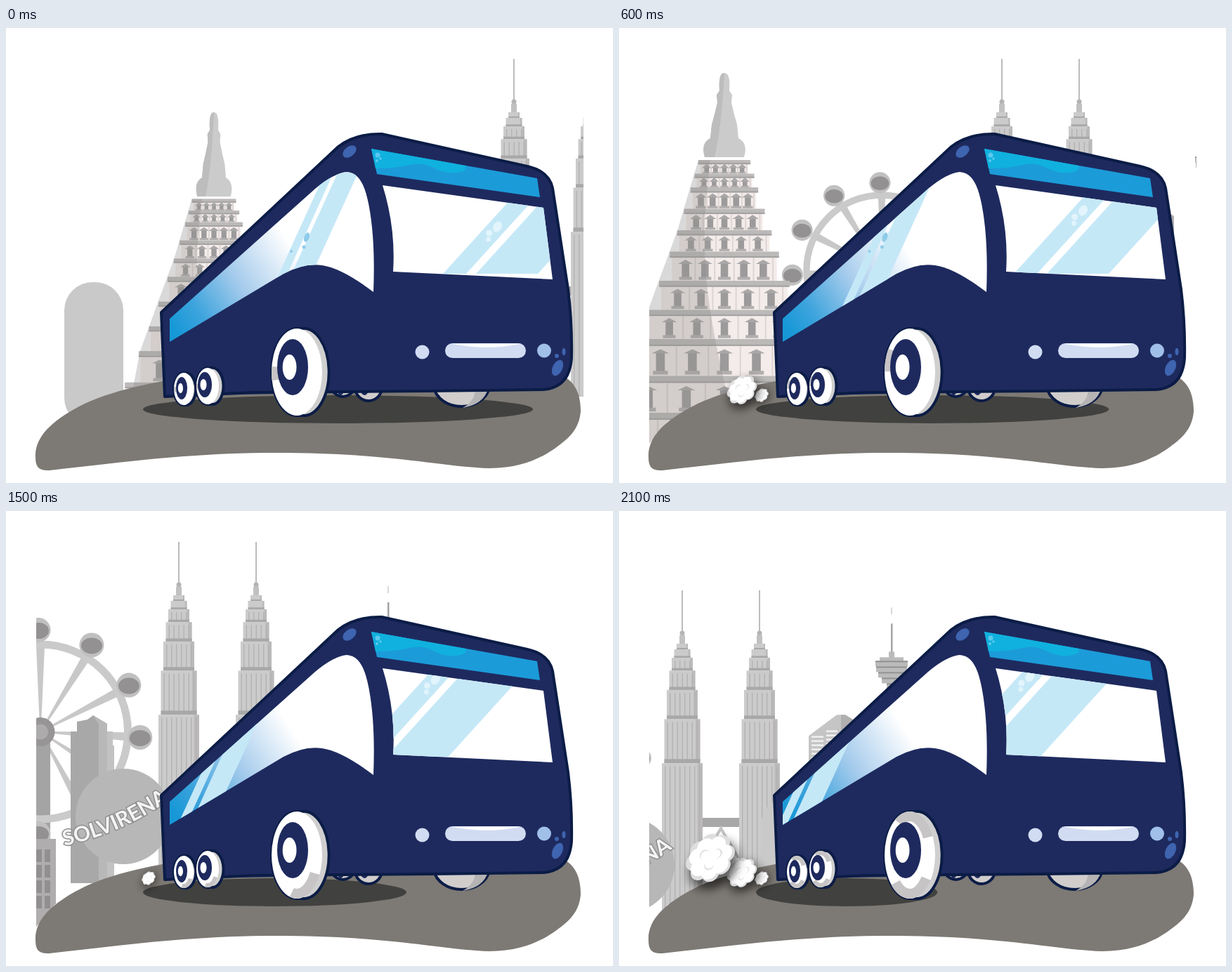
These frames come from a looping animation (864 by 648 pixels, 2400 ms). An HTML page:

```html
<!DOCTYPE html>
<html lang="en">
<head>
<meta charset="utf-8">
<title>Coach tour</title>
<style>
  html, body { margin: 0; width: 100%; height: 100%; overflow: hidden; background: #fff; }
  svg { display: block; width: 100vw; height: 100vh; }
  .sign { font: 700 30px Lato, "Open Sans", sans-serif; fill: #f4f4f4; stroke: #8f8f8f; stroke-width: 3px; paint-order: stroke; }
</style>
</head>
<body>
<svg viewBox="0 0 864 648">
  <defs>
    <clipPath id="stage"><path d="M43 40H822V525H790V560H70L43 592Z"/></clipPath>
    <clipPath id="frontGlass"><path d="M536 224L765 256L778 358L551 347Q555 285 536 224Z"/></clipPath>
    <clipPath id="sideGlass"><path d="M233 414L440 229Q466 207 485 205C503 206 511 225 516 250Q526 300 523 376Q478 342 450 338Q425 334 395 350L233 447Z"/></clipPath>
    <linearGradient id="sideFill" gradientUnits="userSpaceOnUse" x1="240" y1="430" x2="412" y2="318">
      <stop offset="0" stop-color="#1798d7"/><stop offset=".2" stop-color="#3ba3dc"/>
      <stop offset=".55" stop-color="#a5cbec"/><stop offset="1" stop-color="#fff"/>
    </linearGradient>
    <filter id="soft" x="-60%" y="-60%" width="220%" height="220%"><feGaussianBlur stdDeviation="7"/></filter>
  </defs>

  <g clip-path="url(#stage)">
    <g id="wheel"></g>
    <g id="skyline">
      <g id="city" transform="translate(-122)">
        <path d="M-32 530V314H-23V300L-8 297L0 291L20 303V530Z" fill="#a9a8a8"/>
        <path d="M0 291L20 303V530H8V304Z" fill="#b9b8b8"/>
        <path d="M20 314H28V334H30V530H20Z" fill="#c3c2c2"/>
        <path d="M-147 441H-105V540H-147Z" fill="#959394"/>
        <path d="M-110 467H-53V600H-110Z" fill="#afadae"/>
      </g>
      <g id="mast"></g>
      <g id="towers"></g>
      <g transform="translate(-79 435)">
        <circle r="68" fill="#b7b7b7"/>
        <path id="arc" d="M-84 42Q-5 25 60 -20L110 -58" fill="none"/>
        <text class="sign"><textPath href="#arc">SOLVIRENA</textPath></text>
      </g>
    </g>
    <g id="temple"></g>
    <rect id="statue" x="-42" y="362" width="84" height="205" rx="40" fill="#c9c9c9"/>
  </g>

  <path fill="#7d7974" d="M42 612C40 580 70 556 112 535C190 499 330 484 480 482C640 480 750 484 795 497C812 506 818 525 818 546C816 570 803 583 785 596C765 611 735 627 688 627C620 625 550 606 400 605C270 604 180 617 62 630C48 631 42 626 42 612Z"/>
  <ellipse id="shade" cy="543" ry="20" fill="#41413f"/>
  <g id="smoke"></g>

  <g stroke="#0b1c46" stroke-width="4" fill="#d0cdcc">
    <path d="M609 512A40 32 0 0 0 688 512Z"/>
    <path d="M463 512A17 17 0 0 0 496 512ZM497 512A19 19 0 0 0 535 512Z"/>
    <path d="M668 514H686Q680 536 650 541Q668 531 668 514Z" fill="#b5b3b4" stroke="none"/>
    <path d="M470 514Q476 532 483 514ZM503 514Q510 532 518 514Z" fill="#1e2a5e" stroke="none"/>
  </g>

  <path id="body" fill="#1e2a5e" d="M221 405L473 169Q498 150 535 151L742 197Q773 204 778 228L800 372Q806 420 805 470Q802 512 765 515L600 517L350 519L226 525Z"/>
  <path fill="#22376f" d="M500 160L535 151L742 197Q768 203 774 222L756 214L520 172Z"/>
  <path fill="#26417f" d="M221 405L473 169Q498 150 535 151L577 161Q560 172 530 166Q522 190 497 194Q470 196 445 222L233 412L229 525H226Z"/>
  <path fill="#21366f" d="M224 479C300 458 380 430 470 428C560 426 620 452 680 445C740 432 755 392 802 384L805 470Q802 512 765 514L226 524Z"/>
  <path fill="#263f80" d="M420 516C520 515 560 488 630 485C720 483 760 470 805 430V470Q802 512 765 514Z"/>
  <use href="#body" style="fill:none" stroke="none"/>
  <path fill="none" stroke="#0b1c46" stroke-width="4" stroke-linejoin="round" d="M221 405L473 169Q498 150 535 151L742 197Q773 204 778 228L800 372Q806 420 805 470Q802 512 765 515L600 517L350 519L226 525Z"/>
  <g fill="#3f64b0">
    <ellipse cx="489" cy="176" rx="11" ry="7" transform="rotate(-38 489 176)"/>
    <ellipse cx="785" cy="484" rx="7" ry="12" transform="rotate(25 785 484)"/>
    <ellipse cx="794" cy="461" rx="2.5" ry="5"/><circle cx="784" cy="467" r="3"/>
  </g>

  <path fill="#1c9bd9" d="M520 172L756 214L760 241L528 208Z"/>
  <path fill="#10b1de" d="M520 172L654 196Q658 204 640 206C615 209 605 190 580 194Q555 200 526 200Z"/>
  <g fill="#5cc9ee"><circle cx="529" cy="181" r="3.5"/><circle cx="528" cy="189" r="2"/><circle cx="533" cy="186" r="1.8"/></g>

  <g clip-path="url(#frontGlass)">
    <path d="M530 215H785V365H530Z" fill="#fff"/>
    <path id="frontBands" fill="#c5e8f7" d="M-88 350H0L118 220H30ZM-135 350H-102L16 220H-17Z"/>
    <g id="frontDrops" fill="#e2f4fc"><ellipse cx="6" cy="-7" rx="6" ry="8" transform="rotate(30 6 -7)"/><circle cx="-6" cy="2" r="4.5"/><circle cx="-7" cy="11" r="3.5"/></g>
  </g>
  <g clip-path="url(#sideGlass)">
    <path d="M225 200H530V450H225Z" fill="url(#sideFill)"/>
    <g id="sideBands">
      <path fill="#c5e8f7" d="M-79 450H-50L64 200H35ZM-97 450H-85L29 200H17Z"/>
      <g fill="#8fcbea"><ellipse cx="-12" cy="298" rx="3.5" ry="7" transform="rotate(20 -12 298)"/><circle cx="-16" cy="312" r="2.5"/><circle cx="-34" cy="318" r="2"/></g>
    </g>
  </g>

  <g fill="#d1dcf2">
    <circle cx="592.500" cy="461.500" r="10"/><rect x="625" y="449" width="115" height="21" rx="10.500"/>
    <circle cx="766" cy="459.500" r="10" fill="#a1c0e9"/>
    <path fill="#fff" d="M634 449.500H733Q685 460 634 449.500Z"/>
  </g>
  <g id="tyres"></g>
</svg>

<script>
const $ = id => document.getElementById(id);
const STEP = 300, COUNT = 8;

const times = (n, make) => Array.from({ length: n }, (_, i) => make(i)).join("");
const rect = (x, y, w, h, fill) => `<rect x="${x}" y="${y}" width="${w}" height="${h}" fill="${fill}"/>`;
const oval = (x, y, rx, ry, attr) => `<ellipse cx="${x}" cy="${y}" rx="${rx}" ry="${ry}" ${attr}/>`;

function wheel() {
  const spin = i => { const a = i * Math.PI / 6; return a + .055 * Math.sin(a); };
  const spoke = i => `<path d="M-1.500 -18L-6 -122H6L1.500 -18Z" fill="#c9c8c8" transform="rotate(${spin(i) * 180 / Math.PI})"/>`;
  const cabin = i => {
    const x = 145 * Math.sin(spin(i)) - 3, y = -145 * Math.cos(spin(i));
    return oval(x, y, 17.5, 17.5, 'fill="#c1c0c0"') + oval(x, y + 1, 15, 11.5, 'fill="#939192"');
  };
  return times(12, spoke) + rect(-14, 0, 28, 290, "#a5a4a4") + rect(-14, 0, 8, 290, "#979596")
    + `<circle r="124.500" fill="none" stroke="#cbcaca" stroke-width="11"/>` + times(12, cabin)
    + `<circle r="20.500" fill="#979596"/><circle r="11" fill="#adabac"/>`;
}

// Tiers grow taller and wider towards the ground.
function tower() {
  let out = rect(-1, 44, 2, 64, "#bdbcbc") + `<circle cy="105" r="3.500" fill="#b5b4b4"/>` + rect(-4, 108, 8, 12, "#c2c1c1");
  for (let n = 0, y = 120; n < 7; n++) {
    const w = 8 + 3.5 * n, h = n < 6 ? 8 * 1.51 ** n : 310;
    out += rect(-w, y, 2 * w, h, "#cccbcb");
    if (n > 1) for (let x = 4 - w; x < w; x += 7) out += rect(x, y + 4, 1.4, h - 4, "#b3b2b2");
    out += rect(w * .75, y, w * .25, h, "#b3b2b2aa");
    if (n < 6) out += rect(-w, y + h - 2 - n * .8, 2 * w, 2 + n * .8, "#a9a8a8");
    y += h;
  }
  return out;
}

const towers = () => rect(28, 368, 56, 13, "#a9a8a8")
  + `<path d="M30 425L55 383L80 425" fill="none" stroke="#c4c3c3" stroke-width="4"/>`
  + tower() + `<g transform="translate(110)">${tower()}</g>`;

const mast = () => rect(-.5, 107, 1, 10, "#b5b4b4") + rect(-1, 130, 2.5, 50, "#a5a4a4")
  + rect(-4, 170, 8, 330, "#bcbbbb") + rect(-17, 178, 34, 6, "#bcbbbb")
  + times(5, n => {
    const w = 23 - n * n, y = 183 + n * 8;
    return rect(-w, y, 2 * w, 8, "#bcbbbb") + rect(-w, y, 2 * w, 2, "#929191");
  })
  + `<path d="M-118 290L-78 260H-66L-53 268V500H-118Z" fill="#c6c5c5"/><path d="M-72 260H-66L-53 268V500H-72Z" fill="#b0afaf"/>`
  + times(20, n => rect(-114, 290 + n * 6, 17, 2.5, "#f0f0f0") + rect(-93, 282 + n * 6, 16, 2.5, "#f0f0f0"));

function temple() {
  let out = "";
  for (let i = 0, y = 4; i < 11; i++) {
    const h = 19.5 + 11 * Math.floor((i + 1) / 3), w = 36 + .27 * y + .0003 * y * y;
    const inner = w - 3, bar = 4 + h / 9, gap = h - bar, step = inner * .37;
    const size = 4 + gap * .2, top = y + bar + gap * .18;
    out += rect(-inner, y, inner * 2, h, "#f4ecea") + times(5, k => {
      const x = (k - 2) * step;
      return rect(x - size / 2, top, size, gap * .75, "#9c9a9a")
        + `<path d="M${x - size} ${top + 3}L${x} ${top - 3}L${x + size} ${top + 3}Z" fill="#a9a7a7"/>`
        + rect(x - size * .85, top + gap * .65, size * 1.7, gap * .1 + 1, "#b1afaf")
        + rect(x + step / 2 - 1, y + bar, 2, gap, "#dcd5d4");
    }) + rect(-w, y, 2 * w, bar, "#bcb9b9") + rect(-w, y + bar - 2, 2 * w, 2, "#a3a1a1");
    y += h;
  }
  const half = "M0 -142Q-9 -142 -7 -112L-11 -105L-10 -92L-14 -72L-18 -55L-20 -32Q-34 -24 -28 0H";
  return out
    + `<path d="M-37 4L-20 4C-35 120 -30 190 0 320L25 450H-160L-124 260L-93 175L-67 105Z" fill="#8f8c8c" fill-opacity=".33"/>`
    + `<g id="spire"><path d="${half}0Z" transform="scale(-1 1)" fill="#cbcbcb"/><path d="${half}0Z" fill="#cbcbcb"/><path d="${half}-14Q-4 -50 0 -142Z" fill="#bdbdbd"/></g>`;
}

function puff(x, y, r) {
  const lobes = (n, d, size, fill) => times(n, i => {
    const a = i / n * 2 * Math.PI + d;
    return oval(Math.cos(a) * r * d, Math.sin(a) * r * d, r * size, r * size, `fill="${fill}"`);
  });
  return `<g transform="translate(${x} ${y}) rotate(-45) scale(1.08 .85)">`
    + oval(-r * .1, r * .35, r, r, 'fill="#000" fill-opacity=".6" filter="url(#soft)"')
    + lobes(8, .64, .36, "#dedede") + lobes(7, .54, .35, "#fff") + oval(0, 0, r * .6, r * .6, 'fill="#fff"')
    + lobes(3, .3, .2, "#dedede") + lobes(3, .25, .19, "#fff") + "</g>";
}

function tyre(x, y, rx, ry, depth, hubX, hubY, hubRx, hubRy) {
  const band = rx - hubRx;
  return `<path d="M${x} ${y - ry}H${x + depth * .6}A${rx} ${ry} 0 0 1 ${x + depth} ${y + ry}H${x}A${rx} ${ry} 0 0 1 ${x} ${y - ry}Z" fill="#d0cfcf" stroke="#0b1c46" stroke-width="4"/>`
    + oval(x, y, rx, ry, 'fill="#fff"')
    + oval(x, y, rx - band / 2, ry - band / 2, `class="worn" pathLength="360" fill="none" stroke="#c6c4c4" stroke-width="${band}"`)
    + oval(hubX, hubY, hubRx, hubRy, 'fill="#1e2a5e"')
    + oval(hubX - hubRx * .2, hubY, hubRx * .45, hubRy * .45, 'fill="#fff"');
}

$("wheel").innerHTML = wheel();
$("towers").innerHTML = towers();
$("mast").innerHTML = mast();
$("temple").innerHTML = temple();
$("city").innerHTML += times(12, n => rect(-93 + n % 3 * 12, 482 + Math.floor(n / 3) * 22, 8, 18, "#918f90"));
$("smoke").innerHTML = puff(203, 523, 10) + puff(175, 515, 22) + puff(130, 494, 36);
$("tyres").innerHTML = tyre(253, 514, 14, 23, 4, 250, 513, 8, 16)
  + tyre(287, 510, 16, 26, 8, 283, 508, 10, 18)
  + tyre(414, 490, 36, 62, 12, 408, 483, 22, 40);

// Straight travel through [step, value] points.
function along(i, ...pts) {
  const n = Math.max(1, pts.findIndex(p => p[0] >= i));
  const [a, from] = pts[n - 1], [b, to] = pts[n];
  return from + (to - from) * (i - a) / (b - a);
}

const place = (id, x, y, s = 1) => $(id).setAttribute("transform", `translate(${x} ${y}) scale(${s})`);

function pose(i) {
  const scroll = along(i, [0, 723], [2, 545], [3, 447], [4, 372], [5, 246], [7, 90]);
  const drop = 34.5 * Math.max(0, i - 5);
  place("skyline", scroll, drop);
  place("mast", 298, -drop * .56);
  place("statue", scroll + 154 - (i < 4 ? 752 : 0), drop * .65);

  const near = Math.max(0, 1 - Math.abs(i - 4) / 2);
  place("wheel", along(i, [0, 620], [3, 251], [5, 49], [7, -91]), 345 - 61 * near, .86 + .28 * near);

  const size = along(i, [0, .85], [2, 1], [3, 1], [4, .85], [7, .85]);
  place("temple", along(i, [0, 296], [2, 150], [3, 39], [4, 14], [5, -300], [7, -300]),
    along(i, [0, 240], [2, 184], [3, 205], [4, 306], [7, 306]), size);
  $("spire").setAttribute("transform", `scale(1 ${.845 / size})`);

  const reach = 555 - 20 * i - 3.2 * i * i;
  $("shade").setAttribute("cx", 195 + reach / 2);
  $("shade").setAttribute("rx", reach / 2);

  const glare = 757 - 33 * i + 1.5 * i * i, dropY = 243 + 47 * (1 - i / 7) ** 2;
  place("frontBands", glare, 0);
  place("frontDrops", glare - 118 + (350 - dropY) * .91, dropY);
  place("sideBands", 440 - 28 * i + 1.6 * i * i, 0);

  [...$("smoke").children].forEach((p, n) => p.setAttribute("visibility", n < i % 4 ? "visible" : "hidden"));

  // Worn patch creeps round the tyre; a second one faces it late in the loop.
  const start = i < 3 ? 165 + 8 * i : 10 + 5 * i, len = 25 + 8 * i, turn = i > 5 ? 200 : 360;
  for (const ring of document.querySelectorAll(".worn")) {
    ring.setAttribute("stroke-dasharray", `${len} ${turn - len}`);
    ring.setAttribute("stroke-dashoffset", -start);
  }
}

const begin = performance.now();
let shown = -1;
function tick() {
  const i = Math.floor(Math.max(0, performance.now() - begin) / STEP) % COUNT;
  if (i !== shown) pose(shown = i);
  requestAnimationFrame(tick);
}
tick();
</script>
</body>
</html>
```
